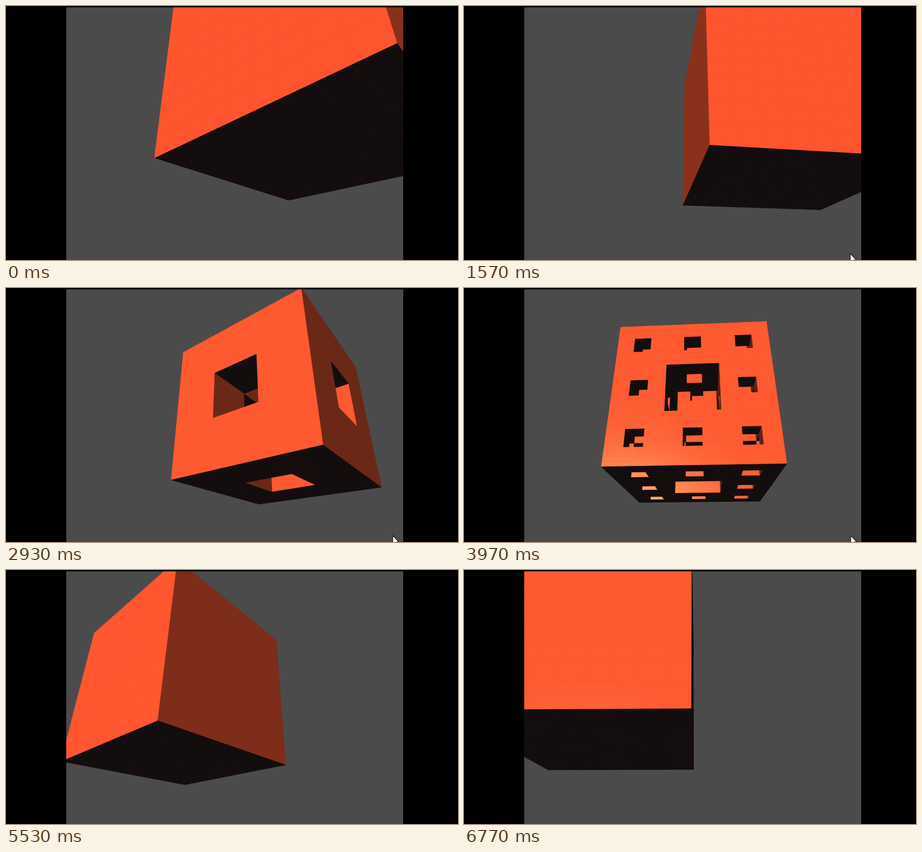
Recreate the animation shown at these times as an HTML page with a canvas. Size 998 by 561 pixels, loop 6840 ms.

```html
<!DOCTYPE html>
<html lang="en">
<head>
<meta charset="utf-8">
<title>Sponge</title>
<style>
  html, body { margin: 0; width: 100%; height: 100%; overflow: hidden; background: #000; }
  canvas { display: block; }
</style>
</head>
<body>
<canvas id="stage" width="998" height="561"></canvas>
<script>
const ctx = document.getElementById('stage').getContext('2d');

const LOOP = 6840, LAST_STEP = 203, STEP_MS = 100 / 3;
const VIEW = { x: 133, y: 3, w: 744, h: 558 };
const CENTER_X = 505, CENTER_Y = 282, FOCAL = 673.6;
const PITCH = 26.74 * Math.PI / 180;
const COS_P = Math.cos(PITCH), SIN_P = Math.sin(PITCH);
const AXIS_DEPTH = 3.17;          // distance from the camera to the spin axis
const N = 9, CELL = 2 / N;
const ORIGIN = [0, 1, -1];        // the cube touches the spin axis with one face
const LIGHT = [-0.316, -0.949];   // horizontal direction, right and forward

let cos, sin, camera, light;

const toLocal = (x, z) => [x * cos + z * sin, 0, z * cos - x * sin];

function setPose(angle) {
  cos = Math.cos(angle);
  sin = Math.sin(angle);
  camera = toLocal(0, -AXIS_DEPTH);
  light = toLocal(...LIGHT);
}

function project([x, y, z]) {
  const right = x * cos - z * sin;
  const ahead = AXIS_DEPTH + x * sin + z * cos;
  const scale = FOCAL / (ahead * COS_P + y * SIN_P);
  return [CENTER_X + right * scale, CENTER_Y - (y * COS_P - ahead * SIN_P) * scale];
}

function isSolid(cell, level) {
  if (cell.some(v => v < 0 || v >= N)) return false;
  for (let l = 0, size = 3; l < level; l++, size /= 3) {
    if (cell.filter(v => Math.floor(v / size) % 3 === 1).length > 1) return false;
  }
  return true;
}

function specular(point, axis, sign) {
  const view = point.map((v, i) => camera[i] - v);
  const len = Math.hypot(...view);
  const half = view.map((v, i) => v / len + light[i]);
  return Math.max(0, half[axis] * sign / Math.hypot(...half)) ** 125;
}

function faceColor(diffuse, shine) {
  if (diffuse <= 0) return 'rgb(20,13,13)';
  const r = 24 + 258 * diffuse + 190 * shine;
  const g = 15 + 78 * diffuse + 190 * shine;
  const b = 8 + 43 * diffuse + 140 * shine;
  return `rgb(${[r, g, b].map(v => Math.round(Math.min(255, v)))})`;
}

function drawQuad(corner, size, axis, sign, splits) {
  const u = (axis + 1) % 3, v = (axis + 2) % 3;
  const at = (a, b) => {
    const p = corner.slice();
    p[u] += a * size;
    p[v] += b * size;
    return p;
  };
  const diffuse = light[axis] * sign;
  const shine = diffuse > 0 ? specular(at(0.5, 0.5), axis, sign) : 0;
  if (shine > 0.01 && splits) {
    for (const a of [0, 0.5]) {
      for (const b of [0, 0.5]) drawQuad(at(a, b), size / 2, axis, sign, splits - 1);
    }
    return;
  }
  ctx.beginPath();
  for (const [a, b] of [[0, 0], [1, 0], [1, 1], [0, 1]]) ctx.lineTo(...project(at(a, b)));
  ctx.closePath();
  ctx.fillStyle = ctx.strokeStyle = faceColor(diffuse, shine);
  ctx.fill();
  ctx.stroke();
}

function drawCell(cell, level) {
  const corner = cell.map((v, i) => ORIGIN[i] + v * CELL);
  for (let axis = 0; axis < 3; axis++) {
    const low = corner[axis], high = low + CELL;
    const sign = camera[axis] < low ? -1 : camera[axis] > high ? 1 : 0;
    if (!sign) continue;
    const next = cell.slice();
    next[axis] += sign;
    if (isSolid(next, level)) continue;
    const start = corner.slice();
    if (sign > 0) start[axis] = high;
    drawQuad(start, CELL, axis, sign, 2);
  }
}

// Cells are painted from far to near along each axis.
function drawSponge(level) {
  const order = ORIGIN.map((o, axis) => {
    const gap = i => Math.abs(o + (i + 0.5) * CELL - camera[axis]);
    return [...Array(N).keys()].sort((a, b) => gap(b) - gap(a));
  });
  ctx.lineWidth = 0.6;
  ctx.lineJoin = 'round';
  for (const i of order[0]) for (const j of order[1]) for (const k of order[2]) {
    if (isSolid([i, j, k], level)) drawCell([i, j, k], level);
  }
}

function levelAt(t) {
  if (t < 2330 || t >= 4430) return 0;
  return t < 3330 ? 1 : 2;
}

function cursorAt(t) {
  if (t < 1500 || t >= 5200) return null;
  if (t < 1900) return [853, 547];
  if (t < 4230) return [854, 547];
  const k = Math.min(1, (t - 4230) / 300);
  return [854 + 10 * k, 547 + 3 * k];
}

function drawCursor([x, y]) {
  ctx.save();
  ctx.translate(x, y);
  ctx.scale(1.1, 1.1);
  ctx.beginPath();
  for (const p of [[0, 0], [0, 17], [4, 13.5], [7, 20], [9.5, 19], [6.5, 12.5], [12, 12.5]]) ctx.lineTo(...p);
  ctx.closePath();
  ctx.fillStyle = '#fff';
  ctx.strokeStyle = '#000';
  ctx.lineWidth = 1;
  ctx.fill();
  ctx.stroke();
  ctx.restore();
}

function draw(time) {
  const t = Math.floor(time % LOOP / 10) * 10;
  const step = Math.min(LAST_STEP, Math.floor((t + 5) / STEP_MS + 1e-6));
  setPose((-44 + 1.1 * step) * Math.PI / 180);

  ctx.fillStyle = '#000';
  ctx.fillRect(0, 0, 998, 561);
  ctx.save();
  ctx.beginPath();
  ctx.rect(VIEW.x, VIEW.y, VIEW.w, VIEW.h);
  ctx.clip();
  ctx.fillStyle = '#4b4b4b';
  ctx.fillRect(VIEW.x, VIEW.y, VIEW.w, VIEW.h);
  drawSponge(levelAt(t));
  const cursor = cursorAt(t);
  if (cursor) drawCursor(cursor);
  ctx.restore();
}

function tick() {
  draw(performance.now());
  requestAnimationFrame(tick);
}
tick();
</script>
</body>
</html>
```
